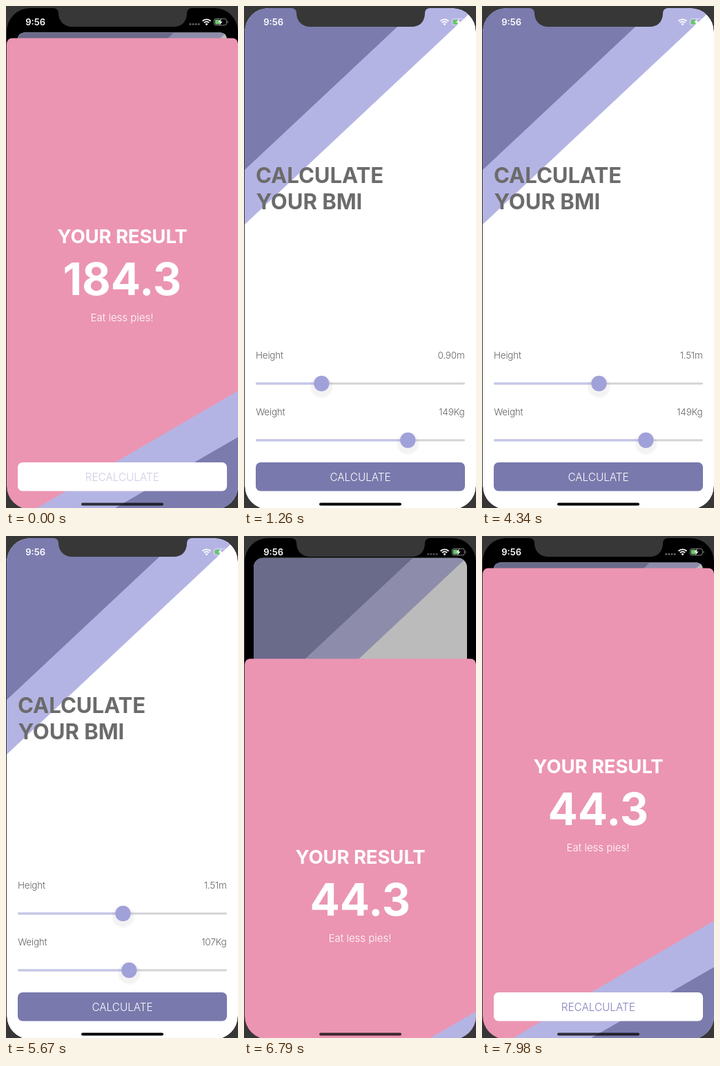
These frames come from a looping animation (336 px wide and 726 px high, 8 s). An HTML page:

```html
<!DOCTYPE html>
<html lang="en">
<head>
<meta charset="utf-8">
<title>BMI calculator</title>
<style>
  html, body { margin: 0; width: 100%; height: 100%; overflow: hidden; background: #373737; }
  svg { display: block; width: 336px; height: 726px; font-family: Inter, Roboto, sans-serif; }
  .title { font-size: 31.1px; font-weight: 700; letter-spacing: -.05px; fill: #6b6b6b; }
  .label { font-size: 13.5px; font-weight: 300; letter-spacing: -.2px; fill: #636363; }
  .button { font-size: 15.3px; font-weight: 300; }
  .end { text-anchor: end; }
  .mid { text-anchor: middle; }
  .dark { fill: #7b7bae; }
  .light { fill: #b4b4e4; }
</style>
</head>
<body>
<svg viewBox="0 0 336 726">
  <defs>
    <clipPath id="screenClip"><rect x="1" y="3" width="335" height="725" rx="34"/></clipPath>
    <clipPath id="cardClip"><rect id="cardShape" x="1" y="3" width="335" height="725"/></clipPath>
    <clipPath id="sheetClip"><rect x="1" y="46.4" width="335" height="720" rx="8"/></clipPath>
    <filter id="soft" x="-50%" y="-50%" width="200%" height="200%"><feGaussianBlur stdDeviation="1"/></filter>
    <g id="thumb">
      <circle cy="4.5" r="16" fill="#000" opacity=".045" filter="url(#soft)"/>
      <circle r="11.2" fill="#a1a1da"/>
    </g>
  </defs>

  <rect width="336" height="726" fill="#373737"/>
  <g clip-path="url(#screenClip)">
    <rect width="336" height="730"/>

    <g id="card">
      <g clip-path="url(#cardClip)">
        <rect width="336" height="730" fill="#fff"/>
        <path class="light" d="M1 3H335L1 316Z"/>
        <path class="dark" d="M1 3H251L1 237Z"/>
        <text class="title" x="17" y="256.2">CALCULATE</text>
        <text class="title" x="17.5" y="294.2">YOUR BMI</text>
        <text class="label" x="17" y="510">Height</text>
        <text class="label end" id="heightText" x="319.5" y="510"></text>
        <text class="label" x="17.2" y="592">Weight</text>
        <text class="label end" id="weightText" x="319.5" y="592"></text>
        <g id="heightSlider" transform="translate(0 546)"></g>
        <g id="weightSlider" transform="translate(0 628)"></g>
        <rect x="17" y="660" width="303" height="41.5" rx="7" fill="#7979ad"/>
        <text class="button mid" id="calc" x="168.5" y="686.5" fill="#fff">CALCULATE</text>
        <rect id="dim" width="336" height="730" fill="#505050"/>
      </g>
    </g>

    <g id="sheet">
      <g clip-path="url(#sheetClip)">
        <rect y="46" width="336" height="721" fill="#eb95b2"/>
        <path class="light" d="M336 556.5L45 726V780H336Z"/>
        <path class="dark" d="M336 623.5L158 726V780H336Z"/>
      </g>
      <g class="mid" fill="#fff">
        <text x="168.6" y="343" font-size="27.5" font-weight="700" letter-spacing="-.1">YOUR RESULT</text>
        <text id="result" x="168.3" y="418.3" font-size="64" font-weight="700"></text>
        <text x="168" y="456" font-size="15" font-weight="300">Eat less pies!</text>
      </g>
      <rect x="17" y="660" width="303" height="41.5" rx="7" fill="#fff"/>
      <text class="button mid" id="recalc" x="168.3" y="686.5" fill="#7f7fbb">RECALCULATE</text>
    </g>

    <text x="28.3" y="28" font-size="13" font-weight="600" fill="#fff">9:56</text>
    <g id="dots" fill="#fff">
      <circle cx="266.8" cy="26.3" r="1.4"/><circle cx="270.9" cy="26.3" r="1.4"/>
      <circle cx="275" cy="26.3" r="1.4"/><circle cx="279.1" cy="26.3" r="1.4"/>
    </g>
    <g fill="none" stroke="#fff" stroke-width="1.9">
      <path d="M284.6 21.8A8.4 8.4 0 0 1 296.4 21.8"/>
      <path d="M286.9 24.2A5.1 5.1 0 0 1 294.1 24.2"/>
    </g>
    <path d="M290.5 28.2L288.5 26.1A2.8 2.8 0 0 1 292.5 26.1Z" fill="#fff"/>
    <rect x="301.3" y="18.4" width="18" height="9.4" rx="2.8" fill="none" stroke="#fff" stroke-opacity=".5"/>
    <path d="M320.5 21.6A1.7 1.7 0 0 1 320.5 24.8Z" fill="#fff" opacity=".5"/>
    <rect x="302.7" y="19.8" width="7" height="6.6" rx="1.4" fill="#67c76a"/>
    <path d="M311.8 18.3L307.3 23.7H310L308.9 27.9L313.6 22.4H310.7Z" fill="#fff"/>
    <rect id="homeBar" x="109" y="718.4" width="119" height="4" rx="2"/>
  </g>
  <path fill="#373737" d="M69 0V3Q76 4 76 10C76 22 84 30 96 30H243C255 30 262 22 262 10Q262 4 269 3V0Z"/>
</svg>

<script>
const LOOP = 8000, STEP = 70;
const CLOSE_AT = 40, OPEN_AT = 6491, SPRING = 0.0102;

// Each move: start, end, from, to
const heightMoves = [[1820, 2660, 0.9, 1.51]];
const weightMoves = [[4760, 5530, 149, 107], [5670, 6020, 107, 101]];

const $ = id => document.getElementById(id);
const clamp = v => Math.max(0, Math.min(1, v));
const ease = v => v * v * (3 - 2 * v);

// Remaining distance of a critically damped spring
function spring(ms) {
  if (ms <= 0) return 1;
  if (ms > 1000) return 0;
  return (1 + SPRING * ms) * Math.exp(-SPRING * ms);
}

function follow(moves, t) {
  return moves.reduce((value, [start, end, from, to]) =>
    t < start ? value : from + (to - from) * ease(clamp((t - start) / (end - start))), moves[0][2]);
}

function makeSlider(id) {
  $(id).innerHTML = `
    <rect x="17" y="-1.4" width="303" height="2.8" rx="1.4" fill="#d4d4d7"/>
    <rect x="17" y="-1.4" height="2.8" rx="1.4" fill="#c6c6ea"/>
    <use href="#thumb"/>`;
  const [, fill, thumb] = $(id).children;
  return part => {
    const x = 28 + 281 * part;
    fill.setAttribute('width', x - 17);
    thumb.setAttribute('x', x);
  };
}

const setHeight = makeSlider('heightSlider');
const setWeight = makeSlider('weightSlider');

function draw(t) {
  const height = follow(heightMoves, t);
  const weight = follow(weightMoves, t);
  setHeight(height / 3);
  setWeight(weight / 200);
  $('heightText').textContent = height.toFixed(2) + 'm';
  $('weightText').textContent = Math.round(weight) + 'Kg';

  // 1 = sheet fully up, 0 = sheet hidden
  const open = t < 3000 ? spring(t - CLOSE_AT) : 1 - spring(t - OPEN_AT);
  const scale = 1 - 0.096 * open;
  $('card').setAttribute('transform',
    `translate(${168.5 * (1 - scale)} ${35.8 * open}) scale(${scale})`);
  $('cardShape').setAttribute('rx', (34 - 25 * open) / scale);
  $('dim').setAttribute('opacity', 0.39 * clamp((open - 0.3) / 0.45));
  $('sheet').setAttribute('transform', `translate(0 ${683 * (1 - open)})`);
  $('sheet').setAttribute('visibility', open > 0 ? 'visible' : 'hidden');
  $('result').textContent = t < 3000 ? '184.3' : '44.3';
  $('dots').setAttribute('opacity', 0.42 * open);
  $('homeBar').setAttribute('opacity', open > 0.03 ? 0.74 : 1);

  $('recalc').setAttribute('opacity', t < 1000 ? 0.4 : 1);
  $('calc').setAttribute('opacity', t >= 6300 && t < 6600 ? 0.35 : 1);
}

function frame() {
  const t = performance.now() % LOOP;
  draw(Math.floor(t / STEP) * STEP);
  requestAnimationFrame(frame);
}
frame();
</script>
</body>
</html>
```
